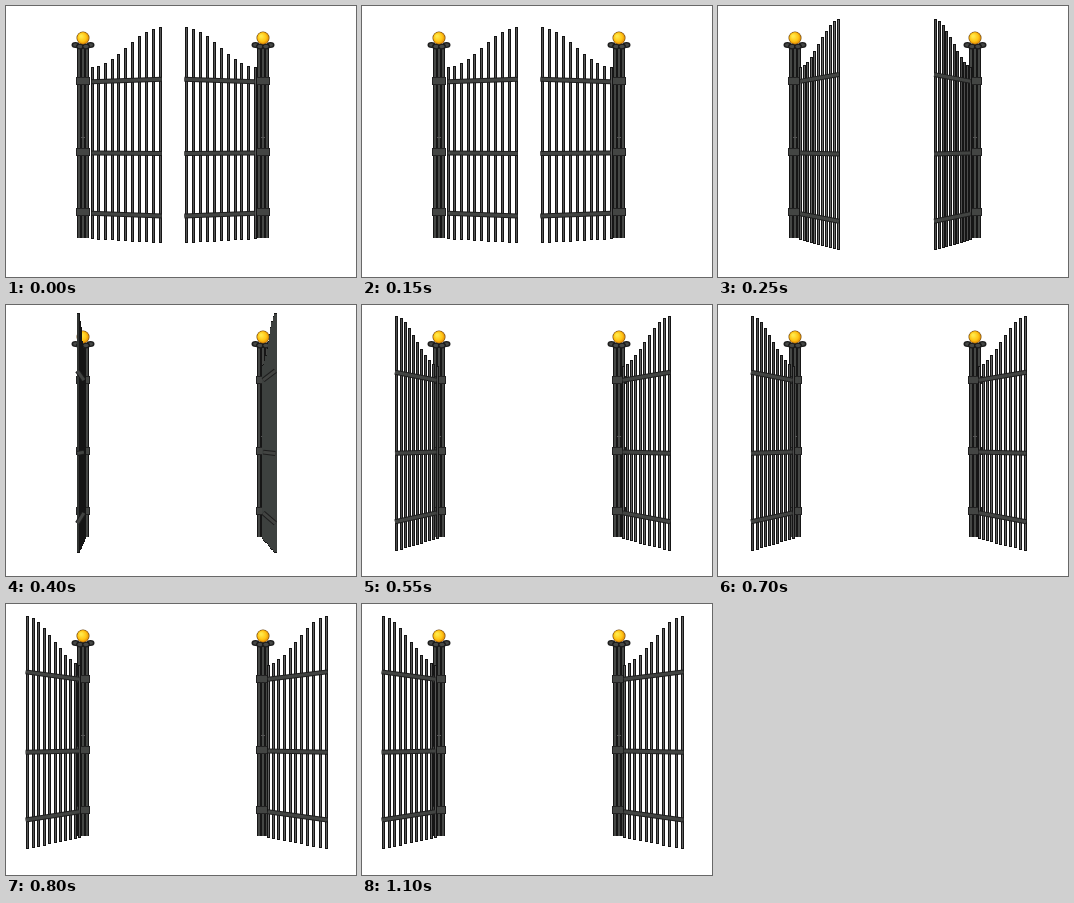
Write an HTML page with a canvas that moves like this. It is 350 by 271 pixels and loops after 1.3 s.

```html
<!DOCTYPE html>
<html lang="en">
<head>
<meta charset="utf-8">
<title>Gate</title>
<style>
  html, body { margin: 0; width: 100%; height: 100%; overflow: hidden; background: #fff; }
  canvas { display: block; }
</style>
</head>
<body>
<canvas id="stage" width="350" height="271"></canvas>
<script>
const ctx = document.getElementById('stage').getContext('2d');
const LOOP = 1300, HORIZON = 138, BARS = 11, FIRST = 0.1;
const RAILS = [76, 147, 207];

// Each pose: end time, scale at the free edge, then for the left and right
// leaf: free edge x, face width, face colour.
const POSES = [
  { until: 250, scale: 1.043, left: [154, 1, '#555'], right: [180, 1, '#555'] },
  { until: 400, scale: 1.117, left: [120, 1, '#666'], right: [217, 1, '#4c4c4c'] },
  { until: 550, scale: 1.16, left: [71.5, 2, '#303331'], right: [269, 3, '#3d413f'] },
  { until: 800, scale: 1.138, left: [34, 1, '#4c4c4c'], right: [307, 1, '#606060'] },
  { until: 1300, scale: 1.128, left: [21, 1, '#555'], right: [320, 1, '#606060'] }
];

function box(x, y, w, h, color) {
  ctx.fillStyle = color;
  ctx.fillRect(x, y, w, h);
}

function line(a, b, width, color) {
  ctx.strokeStyle = color;
  ctx.lineWidth = width;
  ctx.beginPath();
  ctx.moveTo(...a);
  ctx.lineTo(...b);
  ctx.stroke();
}

function disc(x, y, rx, ry, fill) {
  ctx.fillStyle = fill;
  ctx.beginPath();
  ctx.ellipse(x, y, rx, ry, 0, 0, 7);
  ctx.fill();
}

function post(x) {
  box(x - 6, 41, 12, 191, '#161616');
  for (const dx of [-5, -1, 3]) box(x + dx, 42, 2, 190, '#454745');
  box(x - 2, 131, 4, 1, '#555');
  for (const y of RAILS) {
    box(x - 7, y - 5, 14, 8, '#222');
    box(x - 6, y - 4, 12, 6, '#434543');
  }
  for (const dx of [-7.5, 7.5, -3, 3]) {
    const y = Math.abs(dx) > 5 ? 39 : 40.5;
    disc(x + dx, y, 4, 3, '#1c1c1c');
    disc(x + dx, y, 2.5, 1.7, '#464846');
  }
  const gold = ctx.createRadialGradient(x - 2, 30, 1, x, 32, 7);
  gold.addColorStop(0, '#ffe84a');
  gold.addColorStop(0.55, '#ffc414');
  gold.addColorStop(1, '#d87600');
  disc(x, 32, 6.5, 6.5, '#6b4710');
  disc(x, 32, 5.9, 5.9, gold);
}

// A leaf turns on its pivot; its free edge comes nearer and looks larger.
function leaf(pivot, scale, [edge, face, color]) {
  const project = (t, y) => {
    const s = 1 / (1 - t * (1 - 1 / scale));
    return [pivot + (edge - pivot) * t * s / scale, HORIZON + (y - HORIZON) * s];
  };
  for (let i = 0; i < BARS; i++) {
    const k = i / (BARS - 1), t = FIRST + (1 - FIRST) * k;
    const [x, top] = project(t, 61.5 - 17.7 * (1 - Math.cos(Math.PI * k)));
    const y = Math.round(top), h = Math.round(project(t, 233)[1]) - y;
    const mid = Math.round(x);
    box(mid - 1, y, 3, h, '#151515');
    box(face > 1 ? mid - 1 : mid, y + 1, face, h - 2, color);
  }
  for (const y of RAILS) {
    const a = project(FIRST, y), b = project(1.02, y);
    line(a, b, 5, '#1e1e1e');
    line(a, b, 3, '#424442');
  }
}

function draw(now) {
  const time = now % LOOP;
  const pose = POSES.find(p => time < p.until);
  box(0, 0, 350, 271, '#fff');
  post(77);
  post(257);
  leaf(78.5, pose.scale, pose.left);
  leaf(256, pose.scale, pose.right);
}

let start;
function tick(now) {
  start ??= now;
  draw(now - start);
  requestAnimationFrame(tick);
}
draw(0);
requestAnimationFrame(tick);
</script>
</body>
</html>
```
